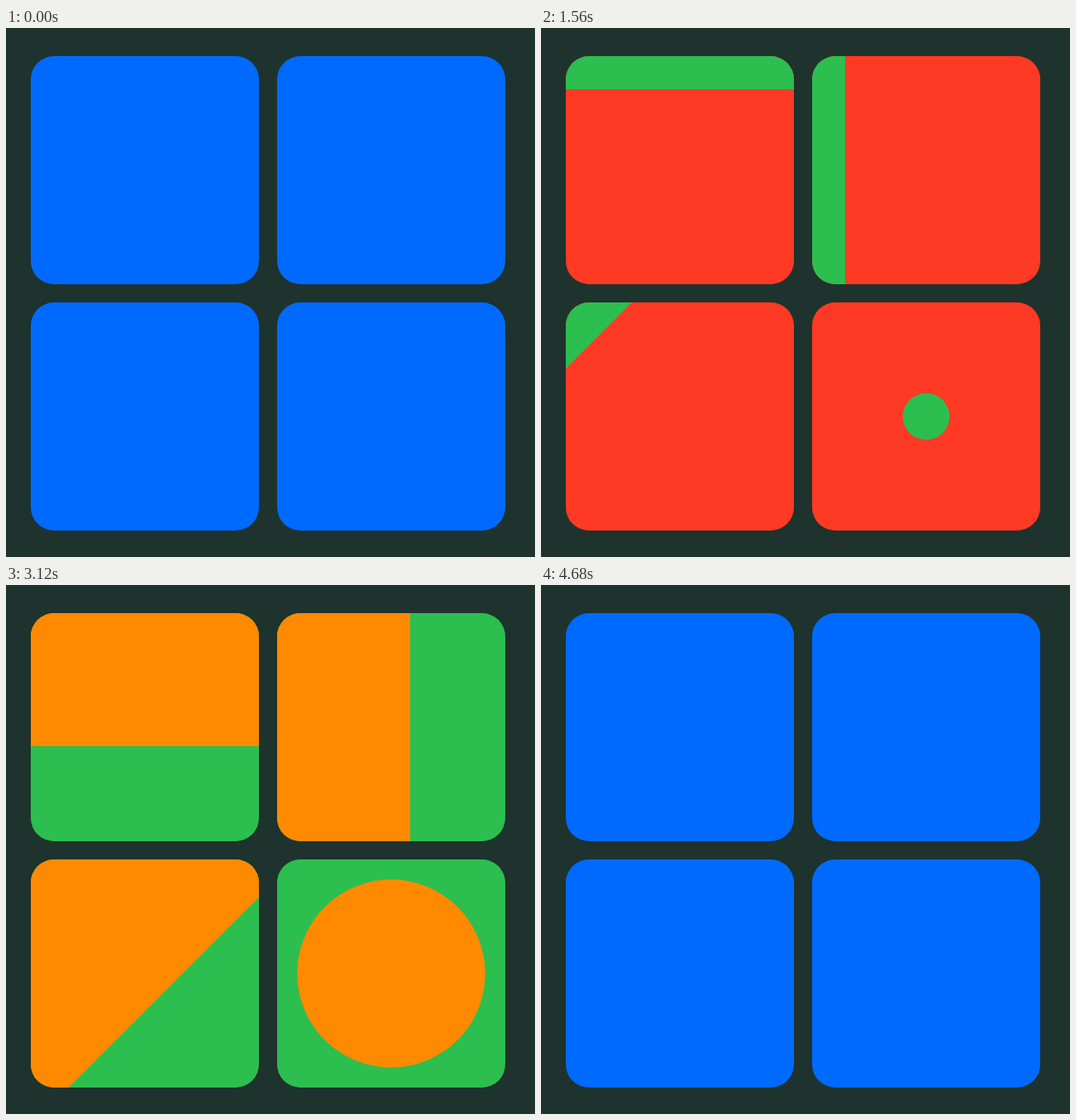
Animation, 640 px wide and 640 px high, one loop 4800 ms. Source, as an HTML page with a canvas:

```html
<!DOCTYPE html>
<html lang="en">
<head>
<meta charset="utf-8">
<title>Four wipes</title>
<style>
  html, body { margin: 0; width: 100%; height: 100%; overflow: hidden; background: #1e332d; }
  canvas { display: block; width: 640px; height: 640px; }
</style>
</head>
<body>
<canvas id="stage" width="640" height="640"></canvas>
<script>
const ctx = document.getElementById('stage').getContext('2d');
const LOOP = 4800, STEP = 60, WIPE = 660;
const SIZE = 276, RADIUS = 28;
const BACK = '#1e332d', BLUE = '#006aff', RED = '#ff3a24', GREEN = '#2cbe4e', ORANGE = '#ff8a00';

const wipes = [
  { start: 222, from: BLUE, to: RED },
  { start: 1396, from: RED, to: GREEN },
  { start: 2755, from: GREEN, to: ORANGE },
  { start: 3856, from: ORANGE, to: BLUE }
];

// Each shape adds the revealed area of a tile for progress p.
const tiles = [
  { x: 30, y: 34, shape: p => ctx.rect(0, 0, SIZE, SIZE * p) },
  { x: 328, y: 34, shape: p => ctx.rect(0, 0, SIZE * p, SIZE) },
  { x: 30, y: 332, shape: p => {
    const d = 2 * SIZE * p;
    ctx.moveTo(0, 0);
    ctx.lineTo(d, 0);
    ctx.lineTo(0, d);
  } },
  { x: 328, y: 332, shape: p => ctx.arc(SIZE / 2, SIZE / 2, SIZE * Math.SQRT1_2 * p, 0, 2 * Math.PI) }
];

const ease = u => (1 - Math.cos(Math.PI * u)) / 2;

function roundTile() {
  ctx.beginPath();
  ctx.roundRect(0, 0, SIZE, SIZE, RADIUS);
}

function drawTile({ x, y, shape }, { from, to }, p) {
  ctx.save();
  ctx.translate(x, y);
  roundTile();
  ctx.fillStyle = p < 1 ? from : to;
  ctx.fill();
  if (p > 0 && p < 1) {
    ctx.clip();
    ctx.beginPath();
    shape(p);
    ctx.fillStyle = to;
    ctx.fill();
  }
  ctx.restore();
}

function draw(time) {
  const t = Math.floor((time % LOOP) / STEP) * STEP;
  const wipe = wipes.filter(w => w.start <= t).pop() || wipes[0];
  const p = ease(Math.min(1, Math.max(0, (t - wipe.start) / WIPE)));
  ctx.fillStyle = BACK;
  ctx.fillRect(0, 0, 640, 640);
  for (const tile of tiles) drawTile(tile, wipe, p);
}

const origin = performance.now();
function tick() {
  draw(performance.now() - origin);
  requestAnimationFrame(tick);
}
tick();
</script>
</body>
</html>
```
